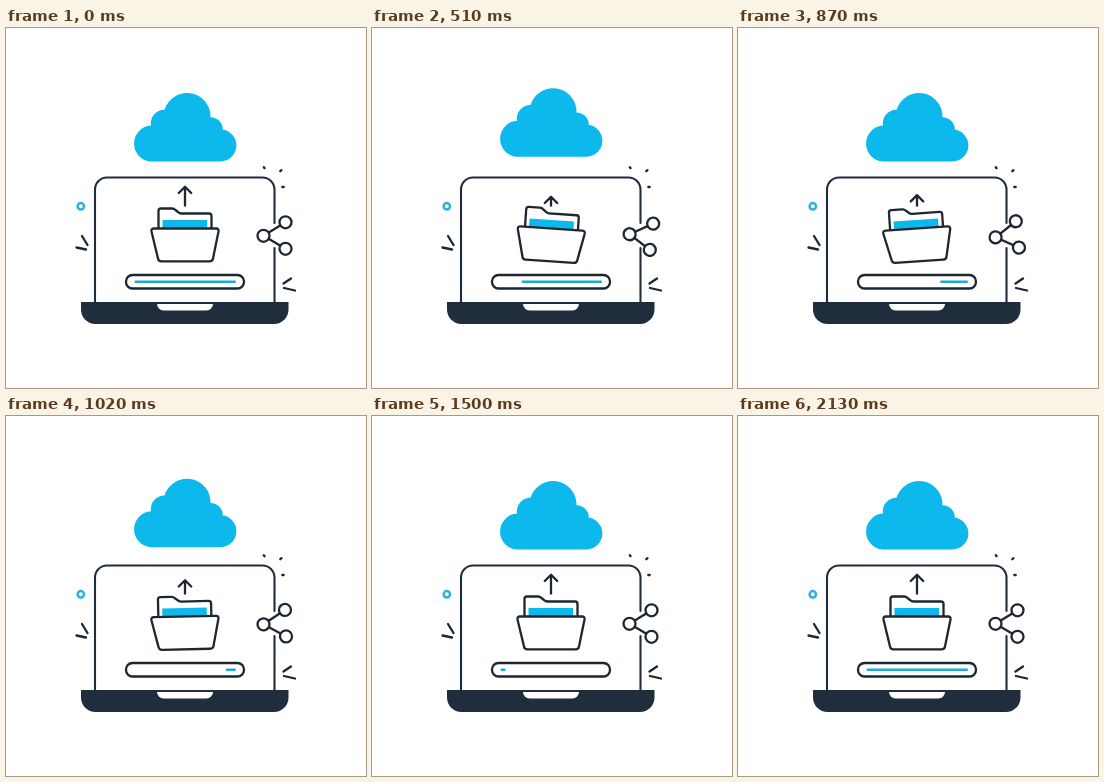
Animation, 360 px wide and 360 px high, one loop 2.16 s. Source, as an HTML page:

```html
<!DOCTYPE html>
<html lang="en">
<head>
<meta charset="utf-8">
<title>Cloud upload</title>
<style>
  html, body { margin: 0; width: 100%; height: 100%; overflow: hidden; background: #fff; }
  svg { display: block; width: 100vw; height: 100vh; }
  .line { fill: none; stroke: #1e2631; stroke-width: 2.3; stroke-linecap: round; stroke-linejoin: round; }
  .screen { stroke: #1f2d3d; stroke-width: 2.1; }
  .paper { fill: #fff; }
  .blue { fill: #0db8ec; }
</style>
</head>
<body>
<svg viewBox="0 0 360 360">
  <clipPath id="slot"><rect x="165" y="150" width="28" height="28.5"/></clipPath>

  <path id="cloud" class="blue" d="M144.500 133.500A18 18 0 0 1 145 97.600A13.500 13.500 0 0 1 158.500 81.800A23.500 23.500 0 0 1 204.500 89.200A12.300 12.300 0 0 1 216.800 101.500A16.100 16.100 0 0 1 214.500 133.500Z"/>

  <!-- laptop -->
  <path class="line screen" d="M89 274V161.500a12 12 0 0 1 12-12H256.500a12 12 0 0 1 12 12V195M268.500 220V274"/>
  <path fill="#1f2d3d" d="M75 274H282.500V281.500a14.500 14.500 0 0 1-14.500 14.500H89.500A14.500 14.500 0 0 1 75 281.500Z"/>
  <path class="paper" d="M151 276H207a6.500 6.500 0 0 1-6.500 6.500H157.500A6.500 6.500 0 0 1 151 276Z"/>

  <!-- sparks -->
  <path class="line" d="M76 208L81.500 217M70.500 219.500L80 221.500M277.500 255.500L285 250.500M278 260L289 262.500M257.800 139.200L258.600 140.200M274.300 143.200L275.500 142.200M276.300 159H277.700"/>
  <circle cx="74.800" cy="178.300" r="3.200" fill="none" stroke="#2fb0dc" stroke-width="2.500"/>

  <g clip-path="url(#slot)">
    <path id="arrow" class="line" d="M179 159V190M172.800 165L179 158.800L185.200 165"/>
  </g>

  <g id="folder">
    <path class="line paper" d="M152.500 202V183Q152.500 180.500 155 180.500H166Q168 180.500 169.500 182L172 184Q173.500 185.500 175.500 185.500H203Q205.500 185.500 205.500 188V202Z"/>
    <rect class="blue" x="156.500" y="192" width="44.500" height="9"/>
    <path class="line paper" d="M148 200.500H210Q213 200.500 212.500 203.500L207 230.500Q206.500 233.300 203.500 233.300H155.500Q152.500 233.300 152 230.500L145.500 203.500Q145 200.500 148 200.500Z"/>
  </g>

  <g id="share" class="line">
    <path d="M279.500 194.300L257.500 207.800L279.500 220.800"/>
    <circle class="paper" cx="257.500" cy="207.800" r="6"/>
    <circle class="paper" cx="279.500" cy="194.300" r="6"/>
    <circle class="paper" cx="279.500" cy="220.800" r="6"/>
  </g>

  <rect class="line" x="120" y="247" width="118" height="13.500" rx="6.500"/>
  <rect id="bar" y="252.600" height="2.400" rx="1.200" fill="#1fa9d8"/>
</svg>
<script>
const LOOP = 2160;
const el = id => document.getElementById(id);
const [cloud, arrow, folder, share, bar] = ['cloud', 'arrow', 'folder', 'share', 'bar'].map(el);

// Cosine ease from 0 to 1 between two times
const ease = (t, from, to) => {
  const p = Math.min(1, Math.max(0, (t - from) / (to - from)));
  return (1 - Math.cos(Math.PI * p)) / 2;
};
// Smooth rise and fall
const hump = (t, from, to) => {
  const mid = (from + to) / 2;
  return ease(t, from, mid) - ease(t, mid, to);
};
const wobble = t =>
  5 * ease(t, 150, 450) - 10 * ease(t, 450, 750) + 4 * ease(t, 750, 1080) + ease(t, 1230, 1440);

function draw(t) {
  const lift = 5.4 * (hump(t, 180, 720) + hump(t, 900, 1440));
  const dip = 10 * (hump(t, 310, 720) + hump(t, 720, 1130));
  const angle = wobble(t);
  cloud.setAttribute('transform', `translate(0 ${-lift})`);
  arrow.setAttribute('transform', `translate(0 ${dip})`);
  folder.setAttribute('transform', `rotate(${angle} 179 207)`);
  share.setAttribute('transform', `rotate(${angle * 1.8} 270 208)`);

  const refill = t > 1300;
  const start = refill ? 0 : 101.5 * ease(t, 200, 1235);
  const end = refill ? 101.5 * ease(t, 1395, 2125) : 101.5;
  bar.setAttribute('x', 128.5 + start);
  bar.setAttribute('width', Math.max(0, end - start));
}

const began = performance.now();
function tick() {
  draw((performance.now() - began) % LOOP);
  requestAnimationFrame(tick);
}
tick();
</script>
</body>
</html>
```
